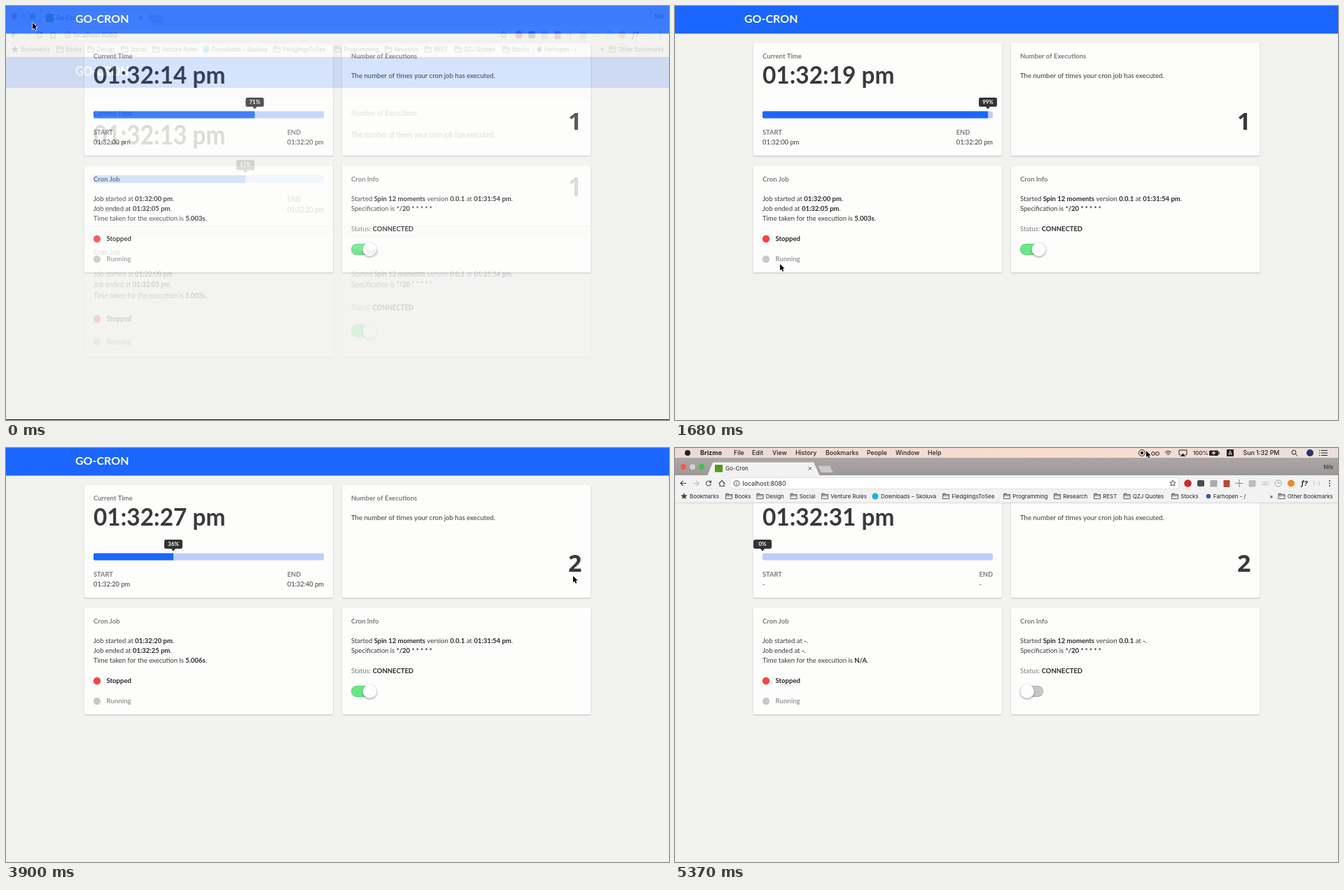
Write an HTML page with a canvas that moves like this. It is 947 px wide and 592 px high and loops after 5.4 s.

```html
<!DOCTYPE html>
<html lang="en">
<head>
<meta charset="utf-8">
<title>Go-Cron</title>
<style>
html, body { margin: 0; width: 947px; height: 592px; overflow: hidden; background: #f2f2ef; }
canvas { display: block; }
</style>
</head>
<body>
<canvas id="stage" width="947" height="592"></canvas>
<script>
const W = 947, H = 592, PERIOD = 5400, STEP = 30;
const CLICK = 4440;            // toggle is switched off
const FADE = 120;              // windowed view fades out
const WIN_TOP = 14, WIN_BAR = 78.5, STRETCH = 1.126;
const BLUE = '#1a66ff', DARK = '#333', MUTED = '#7b7b7b';
const UI = 'Inter, "Liberation Sans", sans-serif';
const BODY = 'Lato, "Open Sans", sans-serif';
const COUNT = '"Open Sans", "Noto Sans", sans-serif';

const stage = document.getElementById('stage').getContext('2d');
const ghostCanvas = document.createElement('canvas');
ghostCanvas.width = W;
ghostCanvas.height = H;
let g = stage;

const clamp = v => Math.max(0, Math.min(1, v));
const ease = v => v * v * (3 - 2 * v);
const lerp = (a, b, u) => a + (b - a) * u;

// ---- drawing helpers ----
function rect(x, y, w, h, color, r = 0) {
  g.fillStyle = color;
  g.beginPath();
  g.roundRect(x, y, w, h, r);
  g.fill();
}

function dot(x, y, r, color) {
  g.fillStyle = color;
  g.beginPath();
  g.arc(x, y, r, 0, 7);
  g.fill();
}

function ring(x, y, r, color, from = 0, to = Math.PI * 2) {
  g.strokeStyle = color;
  g.beginPath();
  g.arc(x, y, r, from, to);
  g.stroke();
}

function line(color, ...pts) {
  g.strokeStyle = color;
  g.beginPath();
  for (let i = 0; i < pts.length; i += 2) g.lineTo(pts[i], pts[i + 1]);
  g.stroke();
}

function poly(color, ...pts) {
  g.fillStyle = color;
  g.beginPath();
  for (let i = 0; i < pts.length; i += 2) g.lineTo(pts[i], pts[i + 1]);
  g.fill();
}

function text(str, x, y, size, color = DARK, weight = 400, align = 'left', family = BODY) {
  g.font = `${weight} ${size}px ${family}`;
  g.fillStyle = color;
  g.textAlign = align;
  g.fillText(str, x, y);
  return g.measureText(str).width;
}

// Parts split by "|" alternate regular and bold.
function rich(str, x, y, color = '#3a3a3a') {
  str.split('|').forEach((part, i) => {
    x += text(part, x, y, 9.5, i % 2 ? '#2a2a2a' : color, i % 2 ? 700 : 400);
  });
}

function withShadow(blur, dy, color, paint) {
  g.save();
  g.shadowColor = color;
  g.shadowBlur = blur;
  g.shadowOffsetY = dy;
  paint();
  g.restore();
}

// ---- state ----
const stamp = s => `01:32:${String(Math.floor(s)).padStart(2, '0')} pm`;
const seconds = t => 14.2 + t * 0.0995 / STEP;

function barLevel(s) {
  const u = s % 20;
  return s >= 20 && u < 0.3 ? lerp(99, 0, u / 0.3) : Math.max(0, (u - 0.2) * 5);
}

function stateAt(s, t) {
  const off = t >= CLICK, base = s >= 20 ? 20 : 0;
  const running = s >= 20 && s < 25;
  const st = {
    clock: stamp(s - 0.04),
    label: Math.round((s % 20) * 5),
    level: barLevel(s),
    start: stamp(base), end: stamp(base + 20),
    jobStart: stamp(base), jobEnd: running ? '-' : stamp(base + 5),
    taken: running ? 'N/A' : base ? '5.006s' : '5.003s',
    count: s >= 25 ? '2' : '1',
    since: '01:31:54 pm',
    running, off, knob: 519.5
  };
  if (off) {
    const u = t - CLICK;
    st.label = 0;
    st.level = barLevel(seconds(CLICK)) * (1 - clamp(u / 150));
    st.start = st.end = st.jobStart = st.jobEnd = st.since = '-';
    st.taken = 'N/A';
    st.knob = 503 + 16.5 * Math.exp(-0.035 * u) * Math.cos(0.0706 * u);
  }
  return st;
}

// ---- web page ----
function card(x, y, h, title) {
  withShadow(2, 1, 'rgba(40,55,100,0.27)', () => rect(x, y, 355, h, '#fdfdfc', 1));
  text(title, x + 13, y + 22.3, 9.5, MUTED, 700);
}

function progress(st) {
  const x = 125 + 329 * st.level / 100;
  rect(125, 150.5, 329, 10, '#bccffc', 2);
  if (st.level > 0.2) rect(125, 150.5, x - 125, 10, BLUE, [2, 0, 0, 2]);
  rect(x - 13, 131, 26, 13, DARK, 2.5);
  poly(DARK, x - 3.5, 143.5, x + 3.5, 143.5, x, 147.5);
  text(st.label + '%', x, 140.2, 7.8, '#fff', 700, 'center');
}

function status(y, name, active, color) {
  dot(130, y, 5.2, active ? color : '#c8c8c8');
  text(name, 143.5, y + 3.3, 9.6, active ? '#262626' : '#999', 700);
}

function toggle(st) {
  rect(493, 340, 33, 16, st.off ? '#aaa' : '#52cf70', 8);
  rect(493.7, 340.7, 31.6, 14.6, st.off ? '#c6c6c6' : '#69e787', 7.3);
  withShadow(3, 1, 'rgba(0,0,0,0.45)', () => dot(st.knob, 348, 10, '#fdfdfd'));
}

function page(st) {
  rect(0, 0, W, H, '#f2f2ef');
  rect(0, 0, W, 39.5, BLUE);
  text('GO-CRON', 99, 24.3, 16, '#fff', 700);

  card(112, 53, 161, 'Current Time');
  text(st.clock, 125, 111, 33.4, '#3a3a3a', 700);
  progress(st);
  text('START', 125, 184.4, 9.3, MUTED, 700);
  text(st.start, 125, 197.5, 9.3, '#3a3a3a');
  g.font = `400 9.3px ${BODY}`;
  const wide = g.measureText(st.end).width;
  g.font = `700 9.3px ${BODY}`;
  const endX = 454 - Math.max(wide, g.measureText('END').width);
  text('END', endX, 184.4, 9.3, MUTED, 700);
  text(st.end, endX, 197.5, 9.3, '#3a3a3a');

  card(480, 53, 161, 'Number of Executions');
  text('The number of times your cron job has executed.', 493, 102.7, 9.6, '#3a3a3a');
  text(st.count, 822.5, 177, 34, '#3a3a3a', 700, 'right', COUNT);

  card(112, 229, 152, 'Cron Job');
  rich(`Job started at |${st.jobStart}|.`, 125, 279);
  rich(`Job ended at |${st.jobEnd}|.`, 125, 292.8);
  rich(`Time taken for the execution is |${st.taken}|.`, 125, 306.6);
  status(333, 'Stopped', !st.running, '#fb4141');
  status(362, 'Running', st.running, '#69e787');

  card(480, 229, 152, 'Cron Info');
  rich(`Started |Spin 12 moments| version |0.0.1| at |${st.since}|.`, 493, 279);
  rich('Specification is |*/20 * * * * *', 493, 292.8);
  rich('Status: |CONNECTED', 493, 321.6, MUTED);
  toggle(st);
}

// ---- browser window ----
const ui = (str, x, y, size = 7.9, weight = 400, color = '#222') =>
  text(str, x, y, size, color, weight, 'left', UI);

function folder(x, y) {
  g.strokeStyle = '#555';
  g.strokeRect(x - 4.5, y - 2.5, 9, 6);
  line('#555', x - 4.5, y - 2.5, x - 4, y - 4, x - 1, y - 4, x, y - 2.5);
  line('#555', x - 4.5, y - 0.8, x + 4.5, y - 0.8);
}

function star(x, y, r, filled) {
  g.beginPath();
  for (let i = 0; i < 10; i++) {
    const a = i * Math.PI / 5 - Math.PI / 2, d = i % 2 ? r * 0.45 : r;
    g.lineTo(x + d * Math.cos(a), y + d * Math.sin(a));
  }
  g.closePath();
  g.fillStyle = g.strokeStyle = '#444';
  filled ? g.fill() : g.stroke();
}

function menuBar() {
  const sky = g.createLinearGradient(0, 0, W, 0);
  sky.addColorStop(0, '#eadbd8');
  sky.addColorStop(0.55, '#f9dccd');
  sky.addColorStop(1, '#ebe0dd');
  rect(0, 0, W, WIN_TOP, sky);
  dot(18, 7, 4, '#222');
  ui('Brizmo', 36, 10.3, 9, 700);
  [['File', 84], ['Edit', 110], ['View', 139], ['History', 172], ['Bookmarks', 215],
   ['People', 274], ['Window', 315], ['Help', 361]].forEach(([s, x]) => ui(s, x, 10.3, 8.8, 500));
  g.lineWidth = 1;
  ring(667, 7, 4.5, '#222');
  rect(665, 5, 4, 4, '#222', 1);
  ring(683, 8, 2.4, '#222');
  ring(689, 8, 2.4, '#222');
  for (let r = 2; r < 8; r += 2.3) ring(704.5, 11, r, '#222', -2.35, -0.8);
  line('#222', 722, 9.5, 720, 9.5, 720, 3, 731, 3, 731, 9.5, 729, 9.5);
  poly('#222', 721.5, 12, 729.5, 12, 725.5, 7.5);
  ui('100%', 740, 10.2, 8, 500);
  rect(763, 3.5, 13, 7.5, '#222', 1.5);
  poly('#f5ded3', 770.5, 4, 766, 7.8, 769, 7.8, 768, 10.5, 773, 6.6, 770, 6.6);
  rect(776.5, 5.5, 1.3, 3.5, '#222');
  rect(788, 2, 10, 10, '#222', 1);
  text('A', 793, 10, 8, '#f4e0d8', 500, 'center', UI);
  ui('Sun 1:32 PM', 811.5, 10.2, 8.8, 500);
  ring(884, 6.2, 3, '#222');
  line('#222', 886.2, 8.4, 889.5, 11.7);
  dot(907, 7, 5, '#2b3470');
  for (let y = 3.5; y < 12; y += 3.5) {
    line('#222', 920, y, 921.5, y);
    line('#222', 923, y, 932, y);
  }
}

function navIcons() {
  g.lineWidth = 1.1;
  line('#444', 16, 50.5, 8, 50.5, 11.5, 47);
  line('#444', 8, 50.5, 11.5, 54);
  line('#bbb', 26, 50.5, 34, 50.5, 30.5, 47);
  line('#bbb', 34, 50.5, 30.5, 54);
  ring(48, 50.5, 3.5, '#444', 0.3, 5.6);
  poly('#444', 52, 46, 52, 50, 48.5, 50);
  line('#444', 62.5, 51, 67, 46.5, 71.5, 51);
  line('#444', 64, 50.5, 64, 54.5, 70, 54.5, 70, 50.5);
}

function extensions() {
  g.lineWidth = 0.9;
  star(711, 50.5, 4.5, false);
  dot(732.5, 50.5, 5.3, '#d0282e');
  rect(746, 46, 10, 9, '#4a4a52', 2);
  rect(764.5, 46, 10, 9.5, '#a9a9a9', 1);
  rect(783.5, 46, 9, 10, '#b5483b', 1);
  line('#777', 806, 45, 806, 56);
  line('#777', 800.5, 50.5, 811.5, 50.5);
  rect(819.5, 46, 10, 9.5, '#bcbcbc', 1);
  ring(841, 50.5, 2.4, '#bbb');
  ring(845.5, 50.5, 2.4, '#bbb');
  ring(861.5, 50.5, 4.6, '#999');
  line('#999', 861.5, 47.5, 861.5, 50.5, 864, 50.5);
  dot(880, 50.5, 5, '#ef8a2c');
  ui('f?', 894.5, 54, 9.5, 'italic 700');
  ui('{··}', 911, 53, 7.5, 400, '#aaa');
  for (let y = 47; y < 56; y += 3.5) dot(935, y, 1, '#444');
}

function windowBar(top, bottom) {
  const strip = g.createLinearGradient(0, WIN_TOP, 0, 40);
  strip.addColorStop(0, top);
  strip.addColorStop(1, bottom);
  rect(0, WIN_TOP, W, 26, strip);
  dot(12, 27, 4, '#f9564f');
  dot(25, 27, 4, '#d3d0d0');
  dot(38, 27, 4, '#35c648');
  poly('#f3f2f2', 46, 40, 54, 20.5, 198, 20.5, 207, 40);
  poly('#cbc8c8', 204, 25.5, 221, 25.5, 226, 35, 209, 35);
  rect(57, 24, 11, 10.5, '#4f9a1c');
  ui('Go-Cron', 72, 32, 8);
  g.lineWidth = 1;
  line('#555', 190.5, 27, 195, 31.5);
  line('#555', 195, 27, 190.5, 31.5);
  text('Nils', 940, 30, 7.6, '#222', 400, 'right', UI);

  rect(0, 39, W, 39.5, '#f3f2f2');
  rect(79.5, 42.5, 640, 16, '#d4d4d4', 2);
  rect(80, 43, 639, 15, '#fff', 2);
  navIcons();
  ring(88, 50.5, 3.8, '#555');
  rect(87.5, 50, 1, 2.7, '#555');
  rect(87.5, 48, 1, 1, '#555');
  ui('localhost:8080', 96.5, 53.7, 8.8);
  extensions();

  g.lineWidth = 0.9;
  star(13, 69, 5, true);
  ui('Bookmarks', 21, 72);
  [['Books', 77], ['Design', 121.5], ['Social', 169.5], ['Venture Rules', 214], ['FledglingsToSee', 387],
   ['Programming', 474], ['Research', 546], ['REST', 603], ['QZJ Quotes', 645.5], ['Stocks', 714],
   ['Other Bookmarks', 866.5]].forEach(([s, x]) => {
    folder(x, 69);
    ui(s, x + 8.3, 72);
  });
  dot(286, 69, 4.5, '#17b4de');
  ui('Downloads – Skoluva', 294, 72);
  dot(762, 69, 3.3, '#2f5fa8');
  ui('Farhopen - /', 769, 72);
  ui('»', 849.5, 72);
  rect(0, 78, W, 0.7, '#c9c9c9');
}

// The windowed view, stretched to the full screen as it fades out.
function paintGhost() {
  g = ghostCanvas.getContext('2d');
  g.setTransform(1, 0, 0, STRETCH, 0, -WIN_TOP * STRETCH);
  g.save();
  g.translate(0, WIN_BAR);
  page(stateAt(13.4, 0));
  g.restore();
  windowBar('#dfe4ee', '#dfe4ee');
  g = stage;
}

// ---- pointer ----
const PATH = [
  [0, 38, 24], [150, 38, 24], [510, 366, 160], [750, 385, 160], [1140, 424, 158], [1260, 424, 158],
  [1620, 150, 369], [2190, 149, 366], [2820, 149, 366], [2940, 141, 337], [3390, 141, 337],
  [3720, 808, 180], [3900, 810, 183], [4050, 826, 192], [4350, 511, 350], [4560, 511, 350],
  [4890, 673, 4], [5400, 673, 4]
];

function pointerAt(t) {
  const i = PATH.findIndex(p => p[0] > t), a = PATH[i - 1], b = PATH[i];
  const u = ease((t - a[0]) / (b[0] - a[0]));
  return [lerp(a[1], b[1], u), lerp(a[2], b[2], u)];
}

function pointer(x, y) {
  g.save();
  g.translate(x, y);
  g.beginPath();
  [[0, 0], [0, 9.3], [2.1, 7.3], [3.7, 10.8], [5.2, 10.1], [3.7, 6.8], [6.6, 6.6]]
    .forEach(p => g.lineTo(...p));
  g.closePath();
  g.lineWidth = 1.4;
  g.lineJoin = 'round';
  g.strokeStyle = '#fff';
  g.stroke();
  g.fillStyle = '#000';
  g.fill();
  g.restore();
}

// ---- playback ----
function draw(t) {
  page(stateAt(seconds(t), t));
  if (t < FADE) {
    g.globalAlpha = 0.165 * Math.exp(-t / 28);
    g.drawImage(ghostCanvas, 0, 0);
    g.globalAlpha = 1;
    rect(0, H - 1, W, 1, '#111');
  }
  const slide = ease(clamp((t - 4890) / 180));
  if (slide > 0) {
    g.save();
    g.translate(0, (slide - 1) * 80);
    windowBar('#aca7a6', '#9c9897');
    menuBar();
    g.restore();
  }
  pointer(...pointerAt(t));
}

const begin = performance.now();
paintGhost();
function tick() {
  const t = (performance.now() - begin) % PERIOD;
  draw(Math.floor(t / STEP) * STEP);
  requestAnimationFrame(tick);
}
tick();
</script>
</body>
</html>
```
